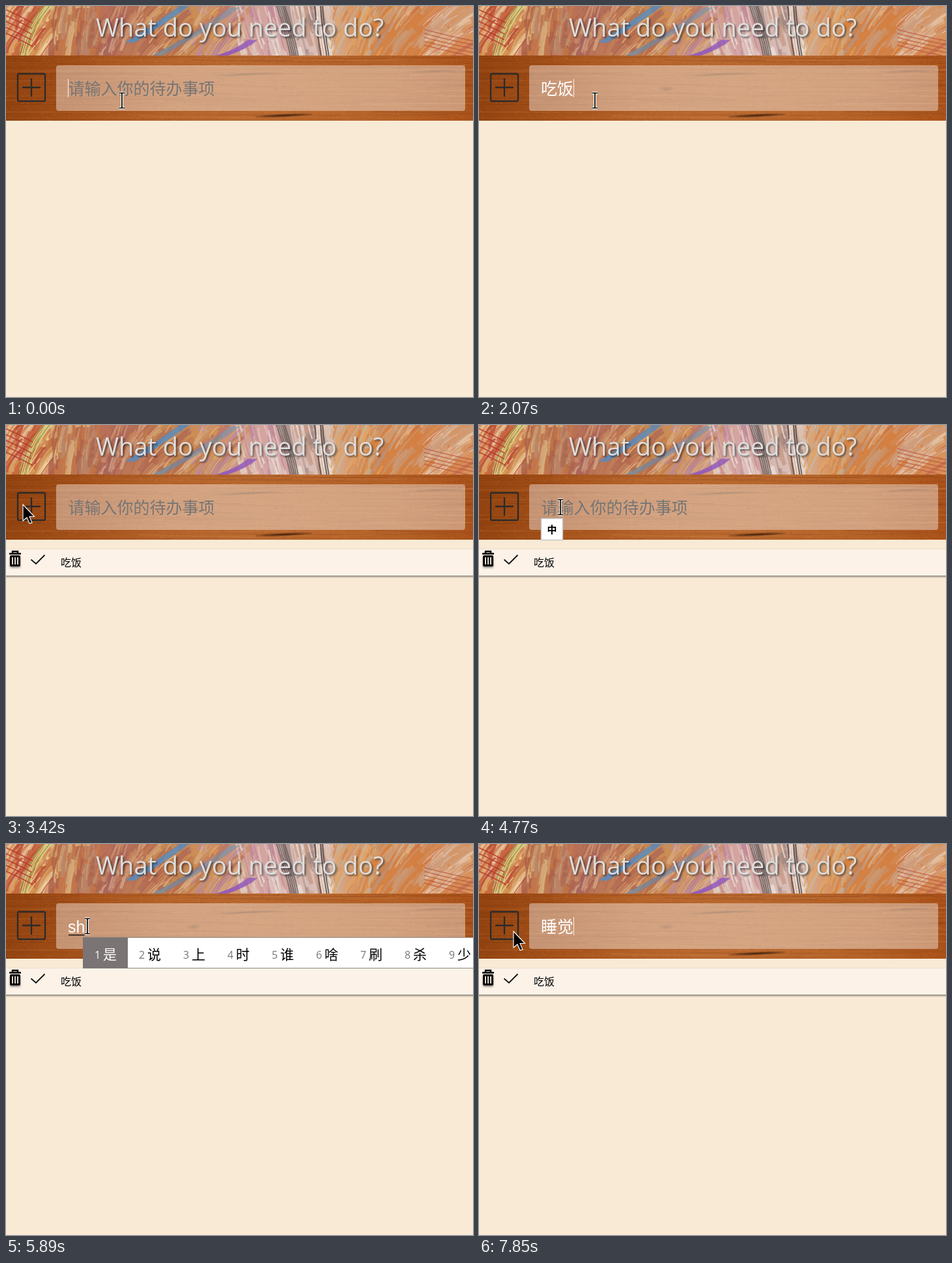
Write an HTML page with a canvas that moves like this. It is 717 px wide and 600 px high and loops after 8 s.

```html
<!DOCTYPE html>
<html lang="zh-CN">
<head>
<meta charset="utf-8">
<title>To-do</title>
<style>
html, body { margin: 0; width: 100%; height: 100%; overflow: hidden; background: #f8ead5; }
canvas, svg { position: absolute; left: 0; top: 0; width: 717px; height: 600px; display: block; }
text { white-space: pre; font-family: "Noto Sans CJK SC", "Noto Sans CJK", sans-serif; }
#title { font: 38px "Open Sans", "Noto Sans", sans-serif; fill: #dedede; filter: drop-shadow(2px 2px 1.5px rgba(0,0,0,.55)); }
#hint { font-size: 25px; fill: #757575; }
#typed { font-family: "Liberation Sans", "Noto Sans CJK SC", sans-serif; font-size: 25px; fill: #fff; }
#row > rect { filter: drop-shadow(0 2px 1.5px rgba(0,0,0,.45)); }
#row text { font-size: 16px; }
.num { font: 16px "Open Sans", "Noto Sans", sans-serif; fill: #777; }
.word { font-size: 21px; }
text.first { fill: #fff; }
</style>
</head>
<body>
<canvas id="paint" width="717" height="600"></canvas>
<svg viewBox="0 0 717 600">
  <text id="title" x="359" y="47" text-anchor="middle">What do you need to do?</text>
  <g fill="none" stroke="#2c2a29" stroke-width="2.3">
    <rect x="18" y="104" width="42" height="42" rx="2"/>
    <path d="M25 125H53M39 111V139"/>
  </g>
  <text id="hint" x="95.5" y="136">请输入你的待办事项</text>
  <text id="typed" x="95" y="136"></text>
  <rect id="line" x="96" y="139" height="1.3"/>
  <rect id="caret" y="112" width="1" height="28" fill="#fff0df"/>
  <g id="row">
    <rect x="-10" y="190.5" width="737" height="40.5" fill="#fcf2e8"/>
    <path d="M0 190.5H717" stroke="#f0e0cc"/>
    <rect x="6" y="200" width="16" height="17" rx="2"/>
    <path d="M5 197.5H23M10 197V194H18V197" fill="none" stroke="#000" stroke-width="2.4"/>
    <path d="M10 203V214M14 203V214M18 203V214" stroke="#fcf2e8" stroke-width="1.8"/>
    <path d="M38.5 206.5L46 213L59.5 199.5" fill="none" stroke="#111" stroke-width="1.8"/>
    <text x="84" y="217">吃饭</text>
  </g>
  <g id="mode">
    <rect x="95.5" y="143.5" width="33" height="33" fill="#fff" stroke="#c6c6c6" stroke-width="1.5"/>
    <text x="104.5" y="165.5" font-size="15" font-weight="700">中</text>
  </g>
  <g id="popup">
    <rect x="118.5" y="143.5" width="620" height="47" fill="#fff" stroke="#8b8785"/>
    <rect id="pick" x="118" y="143.5" height="47"/>
    <g id="words"></g>
    <g id="more">
      <rect x="709.5" y="149.5" width="20" height="35" fill="#eee" fill-opacity=".8" stroke="#c4c4c4"/>
      <path d="M713 159L720 167L713 175" fill="none" stroke="#555" stroke-width="1.5"/>
    </g>
  </g>
  <path id="arrow" d="M0 0V25L6 20L10 29L14 28L10 18.500H17.500Z" stroke="#fff" stroke-width="1.1"/>
  <g id="beam">
    <path id="stem" d="M-4 -11.5H4M0 -11.5V11.5M-4 11.5H4" stroke="#fff" stroke-width="3.4"/>
    <use href="#stem" style="stroke: #000"/>
    <path d="M-4 -11.5H4M0 -11.5V11.5M-4 11.5H4" stroke="#000" stroke-width="1.7"/>
  </g>
</svg>
<script>
const $ = id => document.getElementById(id);
const ctx = $('paint').getContext('2d');
const LOOP = 8000, BLINK = 490, STEP = 120, ADDED = 3420;

let seed = 29;
const rnd = () => (seed = (seed * 16807) % 2147483647) / 2147483647;
const between = (a, b) => a + rnd() * (b - a);
const pickOf = list => list[Math.floor(rnd() * list.length)];

function clipBand(y, h) {
  ctx.save();
  ctx.beginPath();
  ctx.rect(0, y, 717, h);
  ctx.clip();
}

function fillRamp(y, h, colors) {
  const g = ctx.createLinearGradient(0, 0, 717, 0);
  colors.forEach((c, i) => g.addColorStop(i / (colors.length - 1), c));
  ctx.fillStyle = g;
  ctx.fillRect(0, y, 717, h);
}

function stroke(x, y, dx, dy, bend, width, color, alpha = 1) {
  ctx.strokeStyle = color;
  ctx.lineWidth = width;
  ctx.globalAlpha = alpha;
  ctx.beginPath();
  ctx.moveTo(x, y);
  ctx.quadraticCurveTo(x + dx / 2 + bend, y + dy / 2 + bend, x + dx, y + dy);
  ctx.stroke();
}

// Equal vertical bands: sideways lean of the brush, then its colours.
const bands = [
  [38, '#c9693f', '#b94a38', '#f0dca8', '#d9a05a', '#dfb08a'],
  [10, '#c47647', '#a8604a', '#d9b07c', '#b98a70'],
  [25, '#b87058', '#c98a66', '#a6605a', '#d6a988'],
  [60, '#c58752', '#b06a54', '#dcae7c', '#b96a4c'],
  [50, '#cf9058', '#b8705c', '#e0b888', '#bd8c9c'],
  [-15, '#d4a5a2', '#e6d5cb', '#c08a98', '#e9ddd4'],
  [-12, '#d8c0b8', '#ebdfd6', '#a08680', '#c89c88'],
  [28, '#d58444', '#c9b6a0', '#e0a468', '#bcb4a8'],
  [45, '#d37f42', '#c89a78', '#e2b080', '#b9907c'],
  [80, '#d8935c', '#e6cdb4', '#c8704e', '#cfa080']
];

function drawPainting() {
  clipBand(0, 76);
  fillRamp(0, 76, bands.map(b => b[1]));
  for (let i = 0; i < 700; i++) {
    const x = between(0, 717), y = between(0, 100), k = between(.25, .9);
    const [lean, ...colors] = bands[Math.floor(x / 72)];
    const width = i < 350 ? between(4, 11) : between(1, 3.5);
    stroke(x - lean * k / 2, y, lean * k, -60 * k, -4, width, pickOf(colors), between(.4, .85));
  }
  for (let i = 0; i < 5; i++) {
    const o = i * 3;
    stroke(20 + o, 78, 40, -80, -9, 1.6, pickOf(['#f6edcf', '#d8cf80', '#9aa455']));
    stroke(184 + o, 56, 92, -62, 2, 1.8, '#4a8fce', .75);
    stroke(222 + o, 78, 125, -76, 4, 1.4, '#5592c4', .6);
    stroke(318 + o, 78, 55, -26, 5, 2, '#9259bd', .8);
    stroke(415 + o, -2, 22, 80, 4, 2.2, '#5e5655', .7);
    stroke(474 + o, -2, 10, 80, -3, 1.4, pickOf(['#4d4543', '#f3eae1']));
    stroke(-4, 4 + o * 3, 45, 22, -2, 1.8, '#b9352f', .8);
    stroke(642, 36 + o * 2, 78, 18, 2, 1.6, '#bd5541', .7);
  }
  ctx.restore();
}

// Soft tapered mark in the wood.
function streak(x, y, w, h, alpha) {
  ctx.fillStyle = '#1d0d04';
  for (let k = 1; k <= 4; k++) {
    ctx.globalAlpha = alpha / 4;
    ctx.beginPath();
    ctx.ellipse(x, y, w * k / 4, h * k / 4, -.05, 0, 7);
    ctx.fill();
  }
}

function drawWood() {
  clipBand(76, 100);
  fillRamp(76, 100, ['#92430f', '#a5511a', '#b5632a', '#b96930', '#b8662c', '#b46127', '#a95119']);
  for (let i = 0; i < 200; i++) {
    stroke(between(-150, 700), between(76, 176), between(60, 300), between(-4, 4), between(-2, 2),
      between(.5, 1.5), pickOf(['#672a08', '#672a08', '#e3a064']), between(.05, .22));
  }
  for (let i = 0; i < 4000; i++) {
    stroke(between(0, 717), between(76, 176), between(1, 3), 0, 0, 1, pickOf(['#692c09', '#e7a66e']), between(.06, .18));
  }
  streak(427, 168, 44, 2.5, .9);
  streak(370, 105, 55, 2, .35);
  streak(660, 100, 50, 2, .25);
  streak(288, 127, 12, 4, .25);
  ctx.globalAlpha = 1;
  ctx.fillStyle = 'rgba(255,255,255,.4)';
  ctx.beginPath();
  ctx.roundRect(77, 91, 628, 70, 4);
  ctx.fill();
  ctx.restore();
}

const CH = '出吃成车长陈差穿查', SH = '是说上时谁啥刷杀少', SHU = '书数输树属熟束鼠叔';
const CHF = '吃饭 充分 出发 处罚 触发 厨房 成分', SHJ = '睡觉 水晶 水饺 水军 水井 水景 税金';

// Every keystroke or click restarts the caret blink.
const inputs = [
  { t: -280, text: '' },
  { t: 960, text: 'ch', words: [...CH] },
  { t: 1950, text: "ch'f", words: CHF.split(' ') },
  { t: 2070, text: '吃饭' },
  { t: ADDED, text: '', blurred: true },
  { t: 4280, text: '', mode: true },
  { t: 5390, text: 'sh', words: [...SH] },
  { t: 6260, text: 'shu', words: [...SHU] },
  { t: 6380, text: "shui'j", words: SHJ.split(' ') },
  { t: 6870, text: '睡觉' }
];

const glides = [
  { t: 2450, steps: 5, x: 14, y: 122 },
  { t: 3060, steps: 2, x: 26, y: 122 },
  { t: 3790, steps: 6, x: 125, y: 126 },
  { t: 7610, steps: 3, x: 53, y: 134 }
];

const ease = p => p * p * (3 - 2 * p);

function pointer(t) {
  let x = 178, y = 145;
  for (const g of glides) {
    if (t < g.t) break;
    const p = ease(Math.min(1, (Math.floor((t - g.t) / STEP) + 1) / g.steps));
    x += (g.x - x) * p;
    y += (g.y - y) * p;
  }
  return [Math.round(x), Math.round(y)];
}

const show = (id, on) => { $(id).style.display = on ? '' : 'none'; };

function fillWords(words) {
  const pitch = 47 + 21 * words[0].length;
  $('pick').setAttribute('width', pitch + 1);
  $('words').innerHTML = words.map((w, i) => {
    const x = 136 + i * pitch, first = i ? '' : ' first';
    return `<text class="num${first}" x="${x}" y="176">${i + 1}</text>` +
      `<text class="word${first}" x="${x + 13}" y="177">${w}</text>`;
  }).join('');
}

function showInput({ text, words, mode }) {
  $('typed').textContent = text;
  const w = text ? $('typed').getComputedTextLength() : 0;
  $('caret').setAttribute('x', Math.floor(95.2 + w));
  $('line').setAttribute('width', Math.max(0, w - 2));
  show('hint', !text);
  show('line', words);
  show('popup', words);
  show('mode', mode);
  if (words) fillWords(words);
}

let last;
function render(t) {
  const input = inputs.filter(s => s.t <= t).pop();
  const age = t - input.t, fresh = age < BLINK;
  if (input !== last) showInput(last = input);
  $('pick').setAttribute('fill', fresh ? '#a8a19f' : '#7a7574');
  show('more', fresh);
  show('caret', !input.blurred && Math.floor(age / BLINK) % 2 === 0);
  show('row', t >= ADDED);

  const [x, y] = pointer(t);
  const inField = x >= 77 && !(input.words && y >= 143);
  show('beam', inField);
  show('arrow', !inField);
  $(inField ? 'beam' : 'arrow').setAttribute('transform', `translate(${x} ${y})`);
}

drawPainting();
drawWood();
const start = performance.now();
function tick() {
  render((performance.now() - start) % LOOP);
  requestAnimationFrame(tick);
}
tick();
</script>
</body>
</html>
```
